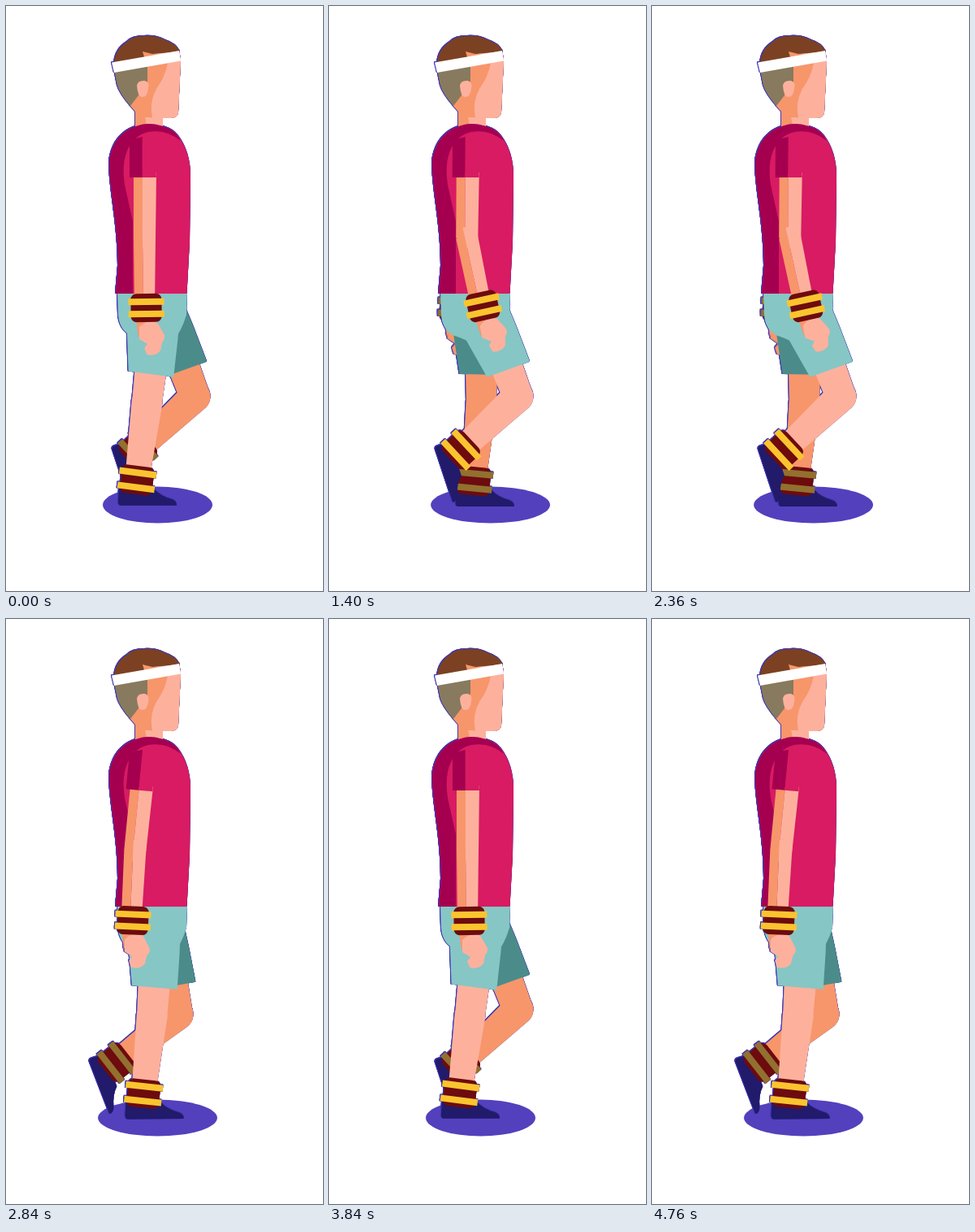
Recreate the animation shown at these times as an HTML page. Size 390 by 720 pixels, loop 4.8 s.

```html
<!DOCTYPE html>
<html lang="en">
<head>
<meta charset="utf-8">
<title>Walk cycle</title>
<style>
  html, body { margin: 0; width: 100%; height: 100%; overflow: hidden; background: #fff; }
  svg { display: block; }
  #figure {
    --edge: #4038b0;
    filter: drop-shadow(.5px 0 0 var(--edge)) drop-shadow(-.5px 0 0 var(--edge)) drop-shadow(0 -.4px 0 var(--edge));
  }
</style>
</head>
<body>
<svg id="stage" width="390" height="720" viewBox="0 0 390 720"></svg>
<script>
const PERIOD = 960, STEP = 40, KEY_STEP = 80;
const THIGH = 126, SHIN = 113;

// Angles in degrees from vertical, positive is forward; one key every 80 ms.
const keys = {
  thigh:   [-6.4, -11, -16, -17, -8, 11, 29, 33, 29, 21, 11, 0],
  shin:    [-7.4, -16, -30, -46, -56, -52, -39, -12, 6, 5, -1, -5.5],
  foot:    [0, 12, 35, 58, 70, 69, 69, 25, -12, -3, 0, 0],
  upper:   [0, 11, 18, 21, 16, 5, -5.5, -15, -21, -24, -21, -11],
  forearm: [.7, 14, 30, 40, 36, 18, 7.3, -6, -15, -18, -14, -5]
};

const near = { skin: '#fdb19d', shade: '#f7966b', shorts: '#86c6c5', sleeve: '#d81b62', stripe: '#fac42f' };
const far = { skin: '#f7966b', shade: '#f7966b', shorts: '#4b8c8a', sleeve: '#a50050', stripe: '#92702f' };

const path = (d, fill) => `<path d="${d}" fill="${fill}"/>`;

const band = (x, y, width, gap, stripe) => `
  <g transform="translate(${x} ${y})">
    <rect x="${-width / 2 + 3}" y="-17.5" width="${width - 6}" height="35" rx="7" fill="#6d0b0e"/>
    ${[-gap, gap].map(v => `<rect x="${-width / 2}" y="${v - 4}" width="${width}" height="8" fill="${stripe}"/>`).join('')}
  </g>`;

const leg = (side, c) => `
  <g id="${side}-thigh">
    <g id="${side}-shin">
      <g id="${side}-foot">${path('M-20-6H23Q31 3 46 7Q52 10 51 14.500H-18Q-21 14-21 10Z', '#221a6b')}</g>
      ${path('M-19 0A19 19 0 0 1 19 0L15 92H-15Z', c.skin)}
      <circle r="18.5" fill="${c.skin}"/>
      ${band(0, 96, 46, 9, c.stripe)}
    </g>
    ${path(`M-20 60H20.500L18.500 ${THIGH}H-18.500Z`, c.skin)}
    ${path('M-30 5L-36 30L-27 90L29 91L29 45L28 10Z', c.shorts)}
  </g>`;

const arm = (side, c) => `
  <g id="${side}-upper">
    ${path('M-12 40H-1V120H-12Z', c.shade)}
    ${path('M-1 40H16L15 120H-1Z', c.skin)}
    <g id="${side}-forearm">
      <circle r="13" fill="${c.shade}"/>
      ${path('M-12 100L-2 98L2 108L-9 122Z', c.shade)}
      ${path('M-8 110Q-3 104 9 102L15 106L23 120Q24 125 20 129L18 139Q12 147 1 144L-2 136L2 131L-8 125Z', c.skin)}
      ${path('M-13.500-1H-2.500V84H-13.500Z', c.shade)}
      ${path('M-2.500-13H13.500V0L11.500 84H-2.500Z', c.skin)}
      ${band(1, 86.5, 44, 7.5, c.stripe)}
    </g>
    ${path('M-17 0L-1-4V46H-17Z', '#a50050')}
    ${path('M-1.300-4Q12-3 14 10L16 46H-1.300Z', c.sleeve)}
  </g>`;

const pelvis = path('M137 353H223L222 380Q216 400 206 412H170Q162 408 152 405Q139 397 138 380Z', near.shorts);

const head = `
  ${path('M159 120H193V155H159Z', '#f7966b')}
  ${path('M171 137H193V155H175Z', near.skin)}
  ${path('M150 60L168 54H213L215 67L212 131Q211 138 203 138H180L159 130L152 122Z', '#f7966b')}
  ${path('M180 56H213L215 67L212 131Q211 138 203 138H180Q176 118 185 102Q196 87 199 70Z', near.skin)}
  ${path('M133 78L174 70V93L163 95V110L153 123Q140 108 137 98Z', '#887a5e')}
  ${path('M161 98Q162 91 171 92Q177 94 175 102Q174 112 167 112Q162 111 161 98Z', near.skin)}
  ${path('M133 71Q134 53 149 44Q155 37 170 37Q185 36 196 42Q209 46 214 56L180 59L168 56L171 66Z', '#7c4122')}
  ${path('M130 69.500L213 55L215 67.500L133 82Z', '#fff')}`;

const shirt = `
  ${path('M160 148Q175 142 193 148Q205 151 212 160Q227 180 227 210L226 290L222.500 354H135L138 320C138 270 128 230 127 195C128 171 141 154 160 148Z', '#d81b62')}
  ${path('M160 148Q175 142 193 148Q208 152 215 166Q197 151 175 155Q158 159 150 176Q142 193 146 220L156 265V354H135L138 320C138 270 128 230 127 195C128 171 141 154 160 148Z', '#a50050')}`;

const stage = document.getElementById('stage');
stage.innerHTML = `
  <ellipse id="shadow" cy="614" ry="22.5" fill="#5340bd"/>
  <g id="figure">
    ${arm('far', far)}${leg('far', far)}
    ${leg('near', near)}${pelvis}
    ${head}${shirt}${arm('near', near)}
  </g>`;

const parts = Object.fromEntries([...stage.querySelectorAll('[id]')].map(el => [el.id, el]));

// Periodic Catmull-Rom interpolation.
function sample(list, time) {
  const n = list.length, pos = (time + PERIOD) % PERIOD / KEY_STEP;
  const i = Math.floor(pos), u = pos - i;
  const [a, b, c, d] = [-1, 0, 1, 2].map(k => list[(i + k + n) % n]);
  return b + u / 2 * (c - a + u * (2 * a - 5 * b + 4 * c - d + u * (3 * (b - c) + d - a)));
}

function place(id, x, y, angle) {
  parts[id].setAttribute('transform', `translate(${x} ${y}) rotate(${angle})`);
}

function poseLeg(side, time) {
  const thigh = sample(keys.thigh, time), shin = sample(keys.shin, time);
  place(side + '-thigh', 187.5, 363, -thigh);
  place(side + '-shin', 0, THIGH, thigh - shin);
  place(side + '-foot', 0, SHIN, shin + sample(keys.foot, time));
}

function poseArm(side, time) {
  const upper = sample(keys.upper, time);
  place(side + '-upper', 169, 165, -upper);
  place(side + '-forearm', 1.5, 120, upper - sample(keys.forearm, time));
}

function draw(now) {
  const time = Math.floor(now / STEP) * STEP % PERIOD;
  const phase = time / PERIOD * 2 * Math.PI;
  poseLeg('near', time);
  poseLeg('far', time - 520);
  poseArm('near', time);
  poseArm('far', time - 480);
  parts.shadow.setAttribute('cx', 186.5 + 12.5 * Math.sin(phase / 2) ** 4);
  parts.shadow.setAttribute('rx', 67.3 + 65 * Math.sin(phase - .05) ** 2);
}

const start = performance.now();
function tick() {
  draw(performance.now() - start);
  requestAnimationFrame(tick);
}
tick();
</script>
</body>
</html>
```
